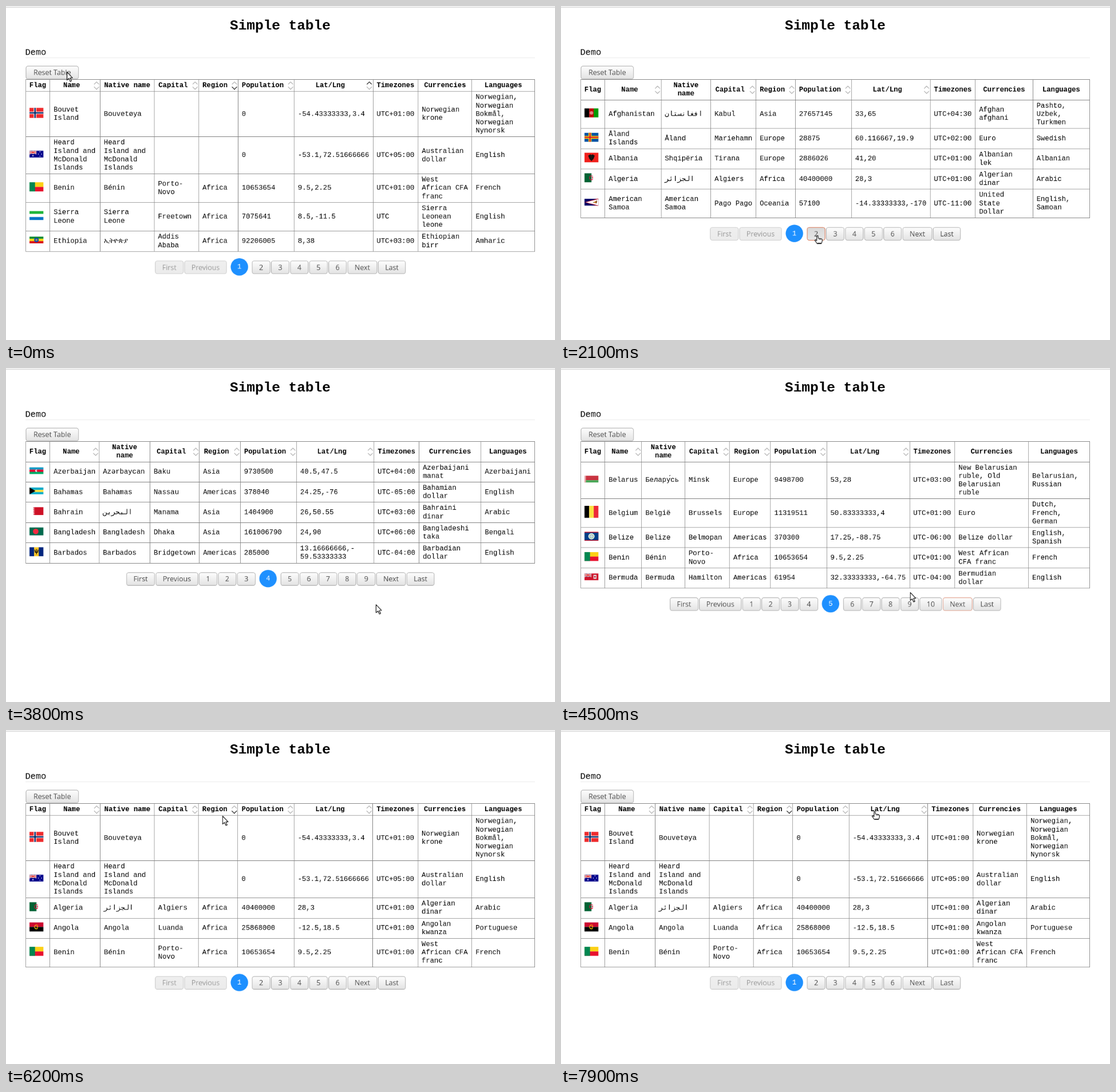
An HTML page with a canvas for the animation above (8000 ms loop, 959x584 px).

```html
<!DOCTYPE html>
<html lang="en">
<head>
<meta charset="utf-8">
<title>Simple table</title>
<style>
html, body { margin: 0; width: 100%; height: 100%; overflow: hidden; background: #fff; }
canvas { display: block; }
</style>
</head>
<body>
<canvas id="stage" width="959" height="584"></canvas>
<script>
// The page is painted at its full size, then shrunk by S onto the stage.
const S = .763, LOOP = 8000, STEP = 100;
const stage = document.getElementById('stage').getContext('2d');
const page = document.createElement('canvas');
page.width = Math.ceil(959 / S);
page.height = Math.ceil(584 / S);
const g = page.getContext('2d');
g.scale(1 / S, 1 / S);

const MONO = '"Liberation Mono", "DejaVu Sans Mono", "Noto Sans Mono", monospace';
const UI = '12.4px "Open Sans", "Noto Sans", sans-serif';
const SIZE = 16 * S, LINE = 19.2 * S, CHAR = 9.602 * S, PAD = 17 * S, ICON = 15.5 * S;
const LEFT = 34.4, TOP = 128.65, WIDTH = 889.1;
const HEADS = ['Flag', 'Name', 'Native name', 'Capital', 'Region', 'Population', 'Lat/Lng', 'Timezones', 'Currencies', 'Languages'];
const SORTABLE = ['Name', 'Capital', 'Region', 'Population', 'Lat/Lng'];

// ---- drawing helpers
function rect(c, x, y, w, h) { g.fillStyle = c; g.fillRect(x, y, w, h); }
function disc(c, x, y, r) { g.fillStyle = c; g.beginPath(); g.arc(x, y, r, 0, 7); g.fill(); }
function trace(pts) {
  g.beginPath();
  for (let i = 0; i < pts.length; i += 2) g.lineTo(pts[i], pts[i + 1]);
}
function poly(c, ...pts) { trace(pts); g.fillStyle = c; g.fill(); }
function line(c, w, ...pts) { trace(pts); g.strokeStyle = c; g.lineWidth = w; g.stroke(); }
function text(s, x, y, font, color = '#000', align = 'left') {
  g.font = font; g.fillStyle = color; g.textAlign = align;
  g.fillText(s, x, y);
}
const snap = v => Math.round(v / S - .5) * S;

// ---- flags, 24 wide, each with its own height
const rows = (h, ...cs) => cs.forEach((c, i) => rect(c, 0, i * h / cs.length, 24, h / cs.length));
const cols = (h, ...cs) => cs.forEach((c, i) => rect(c, i * 8, 0, 8, h));
const cross = (h, c, w) => { rect(c, 9.5 - w / 2, 0, w, h); rect(c, 0, (h - w) / 2, 24, w); };
const emblem = (h, c, r, x = 12) => disc(c, x, h / 2, r);
function crescent(h, c, r) {
  g.beginPath(); g.arc(12, h / 2, r, .8, 5.5);
  g.strokeStyle = c; g.lineWidth = 1.2; g.stroke();
  emblem(h, c, r / 3, 12 + r / 2);
}
const wedge = (c, h, top) => poly(c, 12 - 12 * (1 - top), h * top, 12 + 12 * (1 - top), h * top, 12, h);
function ensign(h, c) {
  rows(h, c);
  rect('#1f2f78', 0, 0, 12, 6);
  for (const [col, w] of [['#fff', 1.5], ['#d22', .6]]) {
    line(col, w, 0, 0, 12, 6); line(col, w, 12, 0, 0, 6);
    rect(col, 6 - w, 0, 2 * w, 6); rect(col, 0, 3 - w, 12, 2 * w);
  }
}
const FLAGS = {
  no: [18, h => { rows(h, '#ef2b2d'); cross(h, '#fff', 4.4); cross(h, '#002868', 2.2); }],
  au: [12, h => {
    ensign(h, '#00008b'); disc('#fff', 6, 9, 1.1);
    for (let a = 0; a < 6; a += Math.PI / 2) disc('#fff', 18 + 2.6 * Math.sin(a), 6 - 4 * Math.cos(a), .8);
  }],
  bj: [16, h => { rows(h, '#fcd116', '#e8112d'); rect('#008751', 0, 0, 9.6, h); }],
  sl: [16, h => rows(h, '#1eb53a', '#fff', '#0072c6')],
  et: [12, h => { rows(h, '#078930', '#fcdd09', '#da121a'); emblem(h, '#0f47af', 4); emblem(h, '#9a9a6a', 1.8); }],
  af: [16, h => { cols(h, '#000', '#be0000', '#009a00'); emblem(h, '#e08080', 3); }],
  ax: [16, h => { rows(h, '#0053a5'); cross(h, '#ffce00', 5); cross(h, '#d21034', 2); }],
  al: [17, h => {
    rows(h, '#f0201c');
    for (const s of [-1, 1]) poly('#111', 12, 4, 12 + 2 * s, 3, 12 + 5.5 * s, 5, 12 + 4 * s, 10, 12, 15);
  }],
  dz: [16, h => { rows(h, '#fff'); rect('#006233', 0, 0, 12, h); crescent(h, '#d21034', 3.4); }],
  as: [12, h => {
    rows(h, '#000066'); poly('#bd1021', 0, 6, 24, -.8, 24, 12.8); poly('#fff', 2, 6, 24, .4, 24, 11.6);
    poly('#8a4a1e', 14, 6.5, 22, 2.5, 21, 8); emblem(h, '#e0a030', 1.4, 18);
  }],
  ad: [17, h => { cols(h, '#0018a8', '#fedf00', '#d0103a'); emblem(h, '#c7803b', 2.5); }],
  ao: [16, h => { rows(h, '#cc092f', '#000'); crescent(h, '#ffcb00', 3.3); }],
  ai: [12, h => { ensign(h, '#012169'); emblem(h, '#fff', 3, 18); emblem(h, '#f4c68a', 1.2, 18); }],
  aq: [16, h => { rows(h, '#3a7dce'); poly('#fff', 5, 3, 8, 5, 15, 2.5, 19, 8, 14, 13.5, 8, 11); }],
  ag: [16, h => {
    rows(h, '#ce1126'); wedge('#000', h, 0); disc('#fcd116', 12, 6.4, 3.6);
    wedge('#0072c6', h, .4); wedge('#fff', h, .65);
  }],
  by: [12, h => { rows(h, '#c8313e', '#c8313e', '#4aa657'); rect('#e7a3a7', 0, 0, 2.5, h); }],
  be: [21, h => cols(h, '#000', '#fae042', '#ed2939')],
  bz: [16, h => {
    rows(h, '#ce1126'); rect('#003f87', 0, 1.5, 24, h - 3);
    emblem(h, '#fff', 5.3); emblem(h, '#8ab88a', 4); emblem(h, '#c8d8e0', 2.8);
  }],
  bm: [12, h => { ensign(h, '#cf142b'); rect('#e0e0e0', 15.5, 2.5, 5, 7); emblem(h, '#cf142b', 1.5, 18); }],
  az: [12, h => { rows(h, '#0098c3', '#e00034', '#00ae65'); crescent(h, '#fff', 1.4); }],
  bs: [12, h => { rows(h, '#00abc9', '#fae042', '#00abc9'); poly('#000', 0, 0, 10.4, 6, 0, 12); }],
  bh: [14, h => {
    rows(h, '#fff'); rect('#ce1126', 9, 0, 15, h);
    for (let y = 0; y < h - 1; y += h / 5) poly('#ce1126', 9, y, 6, y + h / 10, 9, y + h / 5);
  }],
  bd: [14, h => { rows(h, '#006a4e'); emblem(h, '#f42a41', 4.8, 10.8); }],
  bb: [16, h => {
    cols(h, '#00267f', '#ffc726', '#00267f');
    line('#000', 1.3, 12, 3.5, 12, 12.5); line('#000', 1.3, 9.3, 4.5, 10, 9, 14, 9, 14.7, 4.5);
  }]
};

// ---- tables: cells split by "|"; "~" allows a break inside a word
const bouvet = 'no|Bouvet Island|Bouvetøya|||0|-54.43333333,3.4|UTC+01:00|Norwegian krone|Norwegian, Norwegian Bokmål, Norwegian Nynorsk';
const heard = 'au|Heard Island and McDonald Islands|Heard Island and McDonald Islands|||0|-53.1,72.51666666|UTC+05:00|Australian dollar|English';
const benin = 'bj|Benin|Bénin|Porto-~Novo|Africa|10653654|9.5,2.25|UTC+01:00|West African CFA franc|French';
const algeria = 'dz|Algeria|الجزائر|Algiers|Africa|40400000|28,3|UTC+01:00|Algerian dinar|Arabic';
const angola = 'ao|Angola|Angola|Luanda|Africa|25868000|-12.5,18.5|UTC+01:00|Angolan kwanza|Portuguese';

const parts = s => s.split(/(?<=[ ~])/);
const len = s => s.replace(/[\u0301~]/g, '').trim().length;
const sum = (list, key) => list.reduce((n, c) => n + c[key], 0);
function wrap(s, max) {
  const out = [''];
  for (const part of parts(s)) {
    const last = out.length - 1;
    if (out[last] && len(out[last] + part) > max) out.push(part);
    else out[last] += part;
  }
  return out.map(l => l.replace('~', '').trim());
}
// Column widths: every column gets its longest word, spare room goes by how much each still wants.
function table(current, sort, ...data) {
  const grid = [HEADS, ...data.map(s => s.split('|'))];
  const sizes = HEADS.map((head, i) => {
    const widest = f => Math.max(...grid.map((r, k) => PAD + CHAR * f(r[i]) + (k === 0 && SORTABLE.includes(head) ? ICON : 0)));
    return { min: widest(s => Math.max(...parts(s).map(len))), max: widest(len) };
  });
  const least = sum(sizes, 'min'), share = (WIDTH - least) / (sum(sizes, 'max') - least);
  const x = [LEFT], y = [TOP];
  sizes.forEach((c, i) => x.push(x[i] + c.min + (c.max - c.min) * share));
  const cells = grid.map(r => r.map((s, i) => wrap(s, (x[i + 1] - x[i] - PAD) / CHAR + .01)));
  cells.forEach((r, i) => y.push(y[i] + 8 * S + LINE * Math.max(...r.map(c => c.length))));
  return { current, sort, x, y, cells, bottom: y[y.length - 1] };
}
const mixed = table(1, { Region: 'down', 'Lat/Lng': 'up' }, bouvet, heard, benin,
  'sl|Sierra Leone|Sierra Leone|Freetown|Africa|7075641|8.5,-11.5|UTC|Sierra Leonean leone|English',
  'et|Ethiopia|ኢትዮጵያ|Addis Ababa|Africa|92206005|8,38|UTC+03:00|Ethiopian birr|Amharic');
const first = table(1, {},
  'af|Afghanistan|افغانستان|Kabul|Asia|27657145|33,65|UTC+04:30|Afghan afghani|Pashto, Uzbek, Turkmen',
  'ax|Åland Islands|Åland|Mariehamn|Europe|28875|60.116667,19.9|UTC+02:00|Euro|Swedish',
  'al|Albania|Shqipëria|Tirana|Europe|2886026|41,20|UTC+01:00|Albanian lek|Albanian',
  algeria,
  'as|American Samoa|American Samoa|Pago\u00a0Pago|Oceania|57100|-14.33333333,-170|UTC-11:00|United State Dollar|English, Samoan');
const second = table(2, {},
  'ad|Andorra|Andorra|Andorra la Vella|Europe|78014|42.5,1.5|UTC+01:00|Euro|Catalan',
  angola,
  'ai|Anguilla|Anguilla|The Valley|Americas|13452|18.25,-~63.16666666|UTC-04:00|East Caribbean dollar|English',
  'aq|Antarctica|Antarctica||Polar|1000|-74.65,4.48|UTC-03:00, UTC+03:00, UTC+05:00, UTC+06:00, UTC+07:00, UTC+08:00, UTC+10:00, UTC+12:00|Australian dollar, British pound|English, Russian',
  "ag|Antigua and Barbuda|Antigua and Barbuda|Saint John's|Americas|86295|17.05,-61.8|UTC-04:00|East Caribbean dollar|English");
const fourth = table(4, {},
  'az|Azerbaijan|Azərbaycan|Baku|Asia|9730500|40.5,47.5|UTC+04:00|Azerbaijani manat|Azerbaijani',
  'bs|Bahamas|Bahamas|Nassau|Americas|378040|24.25,-76|UTC-05:00|Bahamian dollar|English',
  'bh|Bahrain|البحرين|Manama|Asia|1404900|26,50.55|UTC+03:00|Bahraini dinar|Arabic',
  'bd|Bangladesh|Bangladesh|Dhaka|Asia|161006790|24,90|UTC+06:00|Bangladeshi taka|Bengali',
  'bb|Barbados|Barbados|Bridgetown|Americas|285000|13.16666666,-~59.53333333|UTC-04:00|Barbadian dollar|English');
const fifth = table(5, {},
  'by|Belarus|Белару\u0301сь|Minsk|Europe|9498700|53,28|UTC+03:00|New Belarusian ruble, Old Belarusian ruble|Belarusian, Russian',
  'be|Belgium|België|Brussels|Europe|11319511|50.83333333,4|UTC+01:00|Euro|Dutch, French, German',
  'bz|Belize|Belize|Belmopan|Americas|370300|17.25,-88.75|UTC-06:00|Belize dollar|English, Spanish',
  benin,
  'bm|Bermuda|Bermuda|Hamilton|Americas|61954|32.33333333,-64.75|UTC-04:00|Bermudian dollar|English');
const byRegion = table(1, { Region: 'down' }, bouvet, heard, algeria, angola, benin);

// ---- timeline
const VIEWS = [[0, mixed], [700, first], [2300, second], [3200, fourth], [4400, fifth], [5500, fourth], [6000, byRegion]];
// button, pressed, released, focus lost
const CLICKS = [['Reset Table', 600, 700, 2100], ['2', 2100, 2300, 2300], ['4', 3100, 3200, 3200], ['Next', 4300, 4400, 5300], ['Previous', 5300, 5500, 5900]];
// pointer moves: start, end, x, y
const MOVES = [
  [0, 0, 106, 115], [1000, 1700, 516, 414], [1700, 1900, 448, 401], [3000, 3100, 499, 481],
  [3300, 3600, 560, 510], [3600, 3900, 689, 365], [3900, 4100, 653, 378],
  [4400, 4800, 480, 434], [4800, 5100, 296, 408], [5400, 5500, 359, 252], [5500, 5800, 372, 146],
  [6000, 6200, 378, 150], [6200, 6400, 369, 151], [6500, 6700, 360, 153],
  [6700, 7000, 487, 138], [7100, 7300, 574, 134], [7400, 7600, 659, 123], [7600, 7900, 548, 142]
];
const viewAt = t => VIEWS.filter(v => v[0] <= t).pop()[1];
function pointerAt(t) {
  let x = 0, y = 0;
  for (const [a, b, tx, ty] of MOVES) {
    if (t < a) break;
    const u = b > a ? Math.min(1, (t - a) / (b - a)) : 1;
    x += (tx - x) * u;
    y += (ty - y) * u;
  }
  return [x, y];
}

// ---- parts
function pager({ current }) {
  const names = ['First', 'Previous', ...Array.from({ length: current + 5 }, (_, i) => String(i + 1)), 'Next', 'Last'];
  g.font = UI;
  let x = 0;
  const items = names.map((name, i) => {
    const here = name === String(current);
    const w = here ? 41.2 : g.measureText(name).width + 25;
    const item = { name, here, x, w, off: current === 1 && i < 2 };
    x += w + 1.3;
    return item;
  });
  items.forEach(b => b.x += 479.3 - (x - 1.3) / 2);
  return items;
}
function button({ name, x, w, off }, cy, t) {
  const click = CLICKS.find(([n, from, , lost]) => n === name && t >= from && t < lost);
  const down = click && t < click[2];
  const fill = g.createLinearGradient(0, cy - 11, 0, cy + 11);
  const [a, b] = off ? ['#efefef', '#ebebeb'] : down ? ['#d9d9d9', '#e6e6e6'] : ['#fdfdfd', '#e3e3e3'];
  fill.addColorStop(0, a); fill.addColorStop(1, b);
  g.beginPath(); g.roundRect(x + .5, cy - 11.2, w - 1, 22.4, 3.5);
  g.fillStyle = fill; g.fill();
  g.strokeStyle = down ? '#d9734f' : click ? '#e0a08c' : off ? '#cdcdcd' : '#b0b0b0';
  g.lineWidth = 1; g.stroke();
  text(name, x + w / 2, cy + 4.4, UI, off ? '#999' : '#4a4a4a', 'center');
}
function sortIcon(x, cy, state) {
  for (const [dir, s] of [['up', -1], ['down', 1]])
    line(state === dir ? '#111' : '#aaa', 1.1, x - 4.3, cy + 2.2 * s, x, cy + 6.5 * s, x + 4.3, cy + 2.2 * s);
}
function lines(list, x, cy, weight, align) {
  list.forEach((s, i) =>
    text(s, x, cy + 3 + (i - (list.length - 1) / 2) * LINE, `${weight} ${SIZE}px ${MONO}`, '#000', align));
}
function drawTable({ x, y, cells, sort, bottom }) {
  const top = snap(TOP), end = snap(bottom), right = LEFT + WIDTH;
  y.forEach(v => rect('#808080', snap(LEFT), snap(v), snap(right) - snap(LEFT) + S, S));
  x.forEach(v => rect('#808080', snap(v), top, S, end - top));
  cells.forEach((r, k) => {
    const cy = (y[k] + y[k + 1]) / 2;
    r.forEach((cell, i) => {
      if (k && i) lines(cell, x[i] + PAD / 2, cy, 'normal', 'left');
      if (k) return;
      const can = SORTABLE.includes(HEADS[i]);
      lines(cell, (x[i] + x[i + 1] - (can ? ICON : 0)) / 2, cy, 'bold', 'center');
      if (can) sortIcon(x[i + 1] - 6.3, cy + .2, sort[HEADS[i]]);
    });
    if (!k) return;
    const [h, paint] = FLAGS[r[0][0]];
    g.save();
    g.translate(41, cy - 2.2 - h / 2);
    g.beginPath(); g.rect(0, 0, 24.4, h); g.clip();
    g.scale(24.4 / 24, 1);
    paint(h);
    g.restore();
  });
}
function overLink(view, px, py) {
  const { x, y, bottom } = view;
  if (py > y[0] && py < y[1]) return HEADS.some((h, i) => SORTABLE.includes(h) && px > x[i] && px < x[i + 1]);
  return Math.abs(py - bottom - 28) < 12 && pager(view).some(b => !b.off && !b.here && px > b.x && px < b.x + b.w);
}
function pointer(x, y, hand) {
  g.save();
  g.translate(x, y);
  g.lineJoin = 'round';
  trace(hand
    ? [-1, .7, 1, .7, 1.4, 5, 7, 6, 8.5, 8, 8, 11.5, 6.5, 14.5, -.5, 14.5, -4.5, 9, -3.5, 7.6, -1.2, 9.3]
    : [.5, .5, .5, 14.5, 3.7, 11.6, 6.2, 17, 8.4, 16, 6, 10.8, 10, 10.6]);
  g.closePath();
  g.fillStyle = '#fff'; g.fill();
  g.strokeStyle = '#111'; g.lineWidth = 1.1; g.stroke();
  if (hand) {
    for (const k of [3, 5.3]) line('#111', .8, k, 6, k, 8);
    line('#111', 1.6, 0, 14, 6.5, 14);
  }
  g.restore();
}

function draw(t) {
  const view = viewAt(t), [px, py] = pointerAt(t);
  rect('#fff', 0, 0, 960, 585);
  rect('#f4f4f4', 0, 0, 960, 2);
  rect('#cfcfcf', 0, 2, 960, 1);
  text('Simple table', 479, 41, `bold ${32 * S}px ${MONO}`, '#000', 'center');
  text('Demo', 33.6, 85.3, `${20 * S}px ${MONO}`);
  rect('#ececec', 34, 90, 890, 1);
  drawTable(view);
  button({ name: 'Reset Table', x: 34.5, w: 92.5 }, 116.3, t);
  const cy = view.bottom + 27.9;
  for (const b of pager(view)) {
    if (!b.here) { button(b, cy, t); continue; }
    const cx = b.x + b.w / 2;
    disc('#1e90ff', cx, cy - .7, 15.2);
    text(b.name, cx, cy + 2.8, `${SIZE}px ${MONO}`, '#fff', 'center');
  }
  // the pointer shape lags one step behind a page change
  pointer(px, py, overLink(viewAt(Math.max(0, t - STEP)), px, py));
  stage.imageSmoothingQuality = 'high';
  stage.drawImage(page, 0, 0, page.width * S, page.height * S);
}

const start = performance.now();
function tick() {
  const t = (performance.now() - start) % LOOP;
  draw(Math.floor(t / STEP) * STEP);
  requestAnimationFrame(tick);
}
tick();
</script>
</body>
</html>
```
